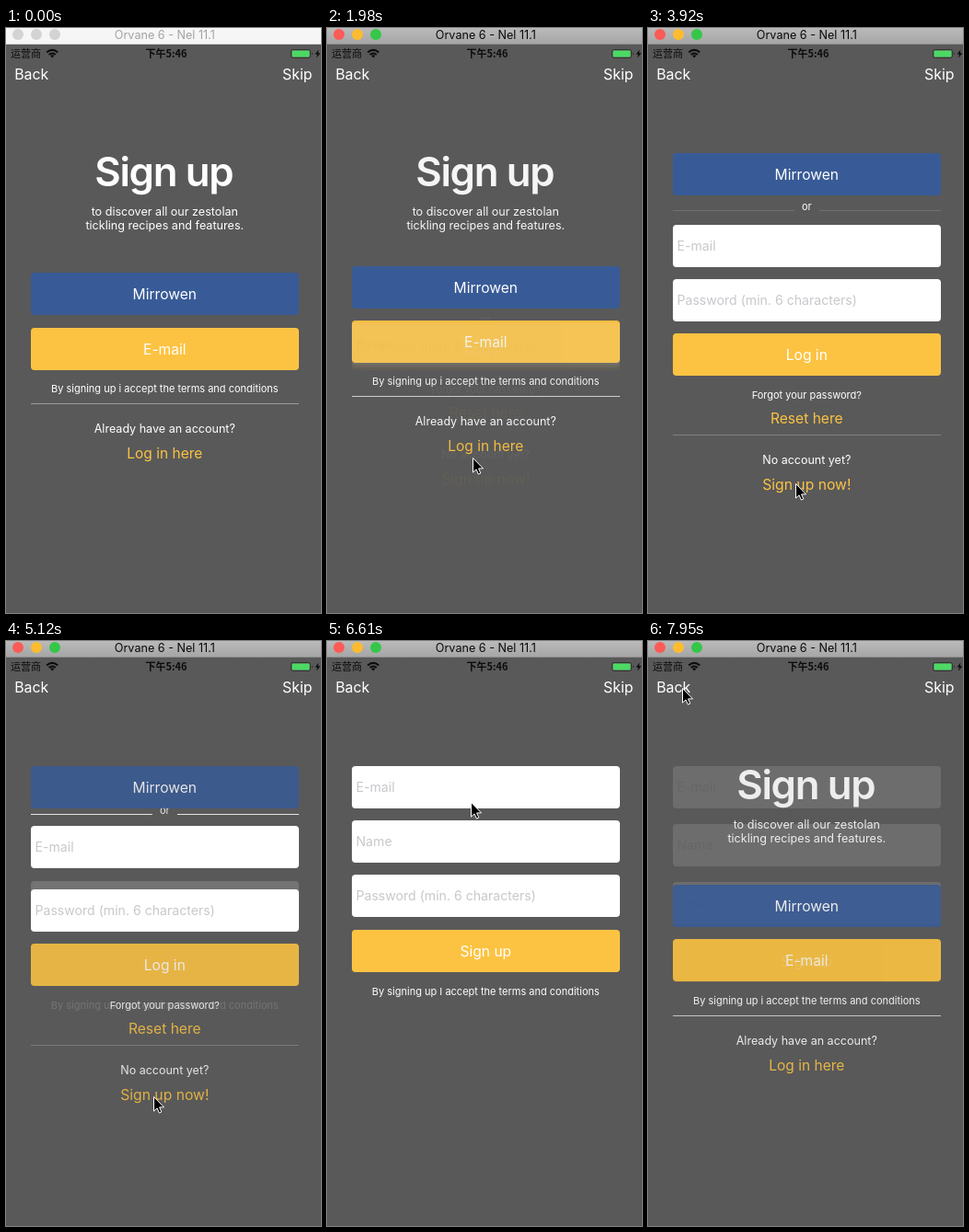
An HTML page that plays this animation: 342 px wide and 636 px high, repeating every 8 s.

```html
<!DOCTYPE html>
<html lang="en">
<head>
<meta charset="utf-8">
<title>Sign up flow</title>
<style>
  html, body { margin: 0; width: 100%; height: 100%; overflow: hidden; background: #595959; }
  svg { display: block; width: 342px; height: 636px; }
  text { font-family: Inter, Roboto, sans-serif; fill: #fff; white-space: pre; }
  .cjk { font-family: "Noto Sans CJK SC", "Noto Sans CJK", sans-serif; fill: #0c0c0c; }
</style>
</head>
<body>
<svg id="stage" viewBox="0 0 342 636">
  <defs>
    <linearGradient id="bar" x1="0" y1="0" x2="0" y2="1">
      <stop offset="0" stop-color="#bababa"/><stop offset="1" stop-color="#a6a6a6"/>
    </linearGradient>
  </defs>
  <rect width="342" height="636" fill="#595959"/>
  <g id="window"></g>
  <g id="status">
    <text class="cjk" x="5" y="32" font-size="11">运营商</text>
    <g fill="none" stroke="#0c0c0c" stroke-width="2">
      <path d="M44.2 26.6Q50.2 21.2 56.2 26.6M46.6 29Q50.2 25.9 53.8 29"/>
    </g>
    <path d="M50.2 32.4L48 30.1Q50.2 28.4 52.4 30.1Z" fill="#0c0c0c"/>
    <text class="cjk" x="174" y="32" font-size="11" font-weight="700" text-anchor="middle">下午5:46</text>
    <rect x="309.5" y="23.5" width="21" height="9" rx="2" fill="none" stroke="#1c1c1c" stroke-opacity=".6"/>
    <rect x="310.5" y="24.5" width="19" height="7" rx="1" fill="#4cd964"/>
    <path d="M332 26.3q1.6 1.7 0 3.4z" fill="#1c1c1c"/>
    <path d="M339.5 23.5L335.5 28.6H338L337 32.5L341.4 27.3H338.8Z" fill="#0c0c0c"/>
  </g>
  <g id="screen"></g>
  <text x="9.2" y="56" font-size="15.9">Back</text>
  <text x="332.5" y="56" font-size="15.9" text-anchor="end">Skip</text>
  <path id="cursor" d="M0 0V15.6L3.6 12.4L5.9 17.6L8.3 16.5L6.1 11.4H11Z"
        fill="#000" stroke="#fff" stroke-width="1" stroke-linejoin="round"/>
</svg>
<script>
const LOOP = 8000, MOVE = 350, ACTIVE_AT = 1980;
const BLUE = '#385b97', GOLD = '#fcc342', CENTER = 172.3;
const $ = id => document.getElementById(id);

// --- drawing helpers -------------------------------------------------
const text = (s, y, size, fill = '#fff', more = '') =>
  `<text x="${CENTER}" y="${y}" font-size="${size}" text-anchor="middle" style="fill:${fill}" ${more}>${s}</text>`;
const box = fill => `<rect x="27" width="291" height="46" rx="4" fill="${fill}"/>`;
const button = (s, fill) => box(fill) + text(s, 29, 15.6);
const field = s => box('#fff') +
  `<text x="31.5" y="28" font-size="14.1" style="fill:#c8c8cc">${s}</text>`;
// rest and move are the line's strength when still and when sliding
const line = (x, y, w, rest, move) =>
  `<rect class="line" x="${x}" y="${y}" width="${w}" height="1" fill="#fff" data-rest="${rest}" data-move="${move}"/>`;

// --- parts, back to front ---------------------------------------------
// Poses: sign-up, log-in, form, form before leaving, sign-up again.
const parts = [
  { y: [325.5, 196, 196, 314, 325.5], on: [1, 0, 0, 0, 1], art: button('E-mail', GOLD) },
  { y: [273, 273, 195, 195, 199], on: [0, 0, 1, 1, 0], art: field('Name') },
  { y: [332, 332, 314, 314, 326], on: [0, 0, 1, 1, 0], art: button('Sign up', GOLD) },
  { y: [18, 18, 0, 0, 11], on: [0, 0, 1, 1, 0],
    art: text('By signing up I accept the terms and conditions', 385, 11) },
  { y: [326, 213.6, 136, 136, 136], on: [0, 1, 1, 1, 0], art: field('E-mail') },
  { y: [326, 273, 254, 254, 263], on: [0, 1, 1, 1, 0], art: field('Password (min. 6 characters)') },
  { y: [130, 0, -62, -62, -62], on: [0, 1, 0, 0, 0],
    art: line(27, 198, 132, .13, 1) + line(186, 198, 132, .13, 1) + text('or', 198, 11) },
  { y: [326, 332, 314, 314, 314], on: [0, 1, 0, 0, 0], art: button('Log in', GOLD) },
  { y: [-6, 0, -18, -18, -18], on: [0, 1, 0, 0, 0],
    art: text('Forgot your password?', 403, 11) + text('Reset here', 430, 15.6, GOLD) +
      line(27, 442, 291, .24, .24) + text('No account yet?', 474, 12.5) +
      text('Sign up now!', 502, 15.7, GOLD) },
  { y: [0, 0, 0, 0, 0], on: [1, 0, 0, 0, 1],
    art: text('Sign up', 171.5, 43.8, '#fff', 'dx="-1" font-weight="600" letter-spacing="-.03em"') +
      text('to discover all our zestolan', 204, 12.6) +
      text('tickling recipes and features.', 219, 12.6) },
  { y: [-.4, -130, -130, -12, 0], on: [1, 0, 0, 0, 1],
    art: text('By signing up i accept the terms and conditions', 396, 11) +
      line(27, 408, 291, .4, .75) + text('Already have an account?', 440, 12.55) +
      text('Log in here', 468, 15.5, GOLD) },
  { y: [266, 136, 136, 254, 266], on: [1, 1, 0, 0, 1], art: button('Mirrowen', BLUE) },
];

for (const part of parts) {
  part.el = document.createElementNS('http://www.w3.org/2000/svg', 'g');
  part.el.innerHTML = part.art;
  $('screen').append(part.el);
  part.lines = [...part.el.querySelectorAll('.line')];
}

// --- window bar ---------------------------------------------------------
const titleBar = (fill, edge, ink, dots) =>
  `<rect width="342" height="17" fill="${fill}"/><rect y="17" width="342" height="1" fill="${edge}"/>` +
  dots.map((c, i) => `<circle cx="${13 + 20 * i}" cy="7" r="6" fill="${c}"/>`).join('') +
  text('Orvane 6 - Nel 11.1', 12, 12.6, ink);
const bars = [
  titleBar('#f6f6f6', '#d0d0d0', '#a3a3a3', ['#d3d3d3', '#d3d3d3', '#d3d3d3']),
  titleBar('url(#bar)', '#8c8c8c', '#0a0a0a', ['#fc5b57', '#fdbc2f', '#34c748']),
];

// --- timing ---------------------------------------------------------------
// The screen is refreshed only at these moments while views slide.
const ticks = [0, 1980, 2130, 2280, 5120, 5270, 5420, 7800, 7950];
// start, from pose, to pose
const slides = [[1930, 0, 1], [5032, 1, 2], [7675, 3, 4]];
// time, x, y of the pointer's tip
const pointer = [
  [500, 151, 545], [650, 151, 544],
  [950, 152, 530], [1100, 155, 498], [1240, 158, 474], [1390, 158, 467],
  [3320, 158, 470], [3470, 159, 477], [3620, 160, 485], [3770, 160, 491], [3920, 160, 495],
  [6170, 174, 400], [6320, 172, 310], [6460, 165, 226], [6610, 156, 175], [6760, 98, 101], [6900, 60, 63],
  [7200, 44, 54], [7350, 37, 51],
];
const lerp = (a, b, p) => a + (b - a) * p;
const ease = u => u * u * (3 - 2 * u);
const latest = (list, ok) => list.filter(ok).pop();

let shownBar = -1;
function draw(t) {
  const bar = t >= ACTIVE_AT ? 1 : 0;
  if (bar !== shownBar) $('window').innerHTML = bars[shownBar = bar];

  const now = latest(ticks, k => k <= t);
  const [start, from, to] = latest(slides, s => s[0] <= now) || [0, 0, 0];
  const p = ease(Math.min(1, (now - start) / MOVE));
  const moving = from !== to && p < 1;
  for (const { el, y, on, lines } of parts) {
    el.setAttribute('transform', `translate(0 ${Math.round(lerp(y[from], y[to], p))})`);
    el.setAttribute('opacity', lerp(on[from], on[to], p));
    for (const l of lines) l.setAttribute('opacity', moving ? l.dataset.move : l.dataset.rest);
  }

  const tip = latest(pointer, k => k[0] <= t);
  $('cursor').setAttribute('visibility', tip ? 'visible' : 'hidden');
  if (tip) $('cursor').setAttribute('transform', `translate(${tip[1] + .5} ${tip[2] + .5})`);
}

const began = performance.now();
function frame() {
  draw((performance.now() - began) % LOOP);
  requestAnimationFrame(frame);
}
draw(0);
requestAnimationFrame(frame);
</script>
</body>
</html>
```
